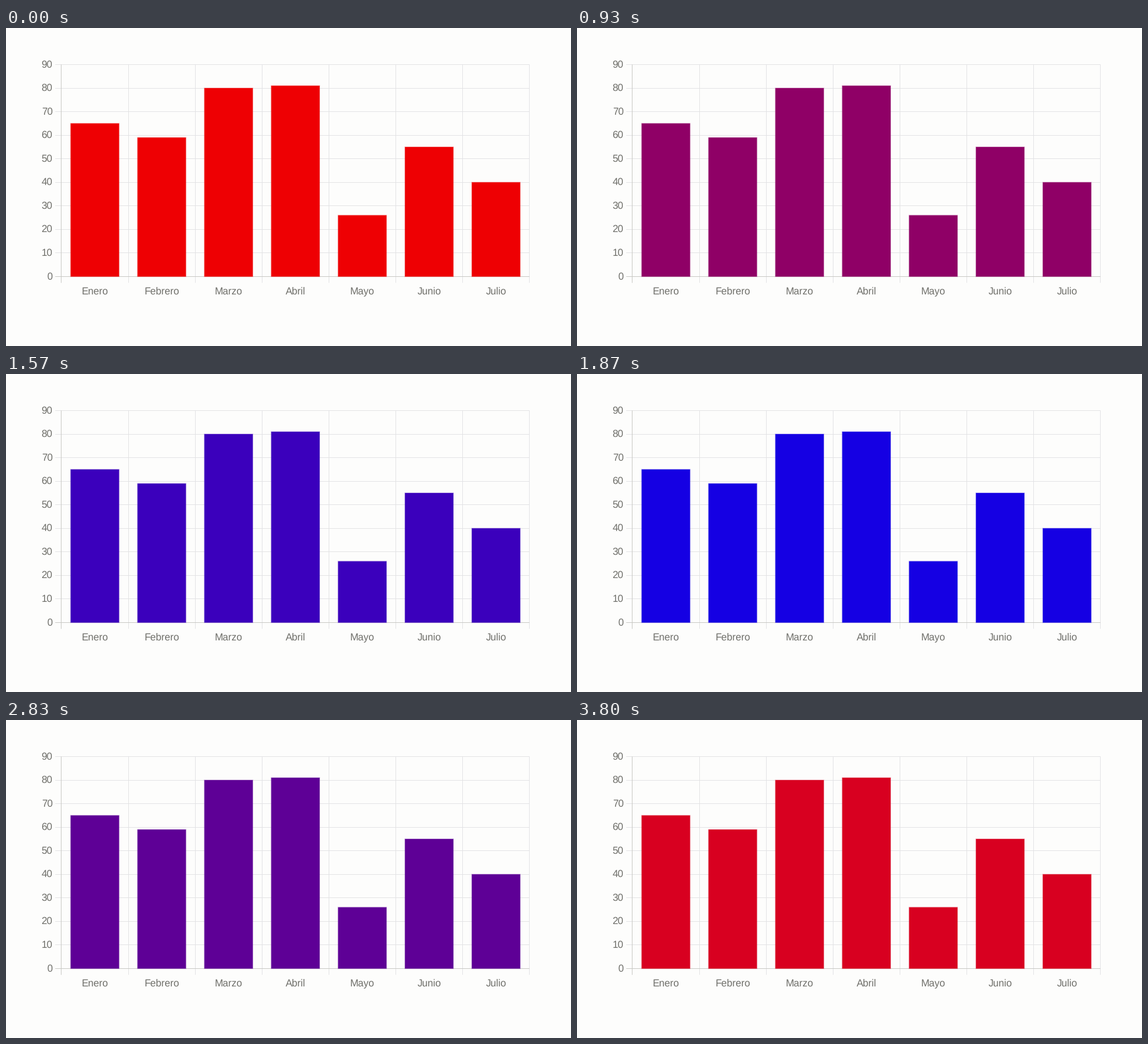
Recreate the animation shown at these times as a matplotlib script. Size 998x561 px, loop 3830 ms.

```python
import math
import numpy as np
import matplotlib.pyplot as plt
from matplotlib.animation import FuncAnimation
from matplotlib.colors import to_rgba
from matplotlib.patches import Rectangle

W, H, DPI = 998, 561, 64
PX = 72 / DPI                     # points per pixel
LOOP, FRAMES = 3830, 115
LEFT, STEP, TOP, BASE = 97.9, 118.1, 64.5, 438.5
TICK = 11

MONTHS = ["Enero", "Febrero", "Marzo", "Abril", "Mayo", "Junio", "Julio"]
VALUES = [65, 59, 80, 81, 26, 55, 40]
RIGHT = LEFT + STEP * len(MONTHS)

# Red fades to blue and back at a nearly constant rate
KEY_MS = [0, 50, 630, 1270, 1870, 2050, 2110, 2830, 3330, 3800]
RED = [236, 243, 177, 100, 22, 3, 3, 92, 160, 216]
BLUE = [4, 2, 67, 146, 226, 243, 243, 152, 88, 32]

GRID, AXIS, TEXT, PAPER = "#e2e2e4", "#c6c6c2", "#70706b", "#fdfdfc"

plt.rcParams["font.family"] = "Liberation Sans"
plt.rcParams["text.hinting"] = "none"
plt.rcParams["toolbar"] = "None"

fig = plt.figure(figsize=(W / DPI, H / DPI), dpi=DPI, facecolor=PAPER)
ax = fig.add_axes([0, 0, 1, 1])
ax.set_xlim(0, W)
ax.set_ylim(H, 0)
ax.axis("off")


def y_of(value):
    return BASE - value * (BASE - TOP) / 90


def crisp(v):
    """Centre of the pixel that holds v."""
    return math.floor(v) + 0.5


def line(xs, ys, color, z=1):
    ax.plot(xs, ys, color=color, lw=PX, solid_capstyle="butt", snap=False, zorder=z)


def hline(y, color, z=1):
    line([LEFT - TICK, RIGHT], [crisp(y)] * 2, color, z)


def vline(x, color, z=1):
    line([crisp(x)] * 2, [TOP, BASE + TICK], color, z)


def label(x, y, text, align):
    ax.text(x, y, text, ha=align, va="baseline", color=TEXT, fontsize=17.6 * PX)


for value in range(0, 91, 10):
    hline(y_of(value), GRID)
    label(82.2, y_of(value) + 4.9, str(value), "right")

for i in range(len(MONTHS) + 1):
    vline(LEFT + i * STEP, GRID)

vline(LEFT, AXIS, 2)
hline(BASE, AXIS, 2)

bars = []
width = 0.723 * STEP
for i, (month, value) in enumerate(zip(MONTHS, VALUES)):
    mid = LEFT + (i + 0.5) * STEP
    bar = Rectangle((mid - width / 2, y_of(value)), width, BASE - y_of(value),
                    lw=1.6 * PX, zorder=3, snap=False)
    bars.append(ax.add_patch(bar))
    label(mid, 470, month, "center")


def update(n):
    ms = (n + 0.5) * LOOP / FRAMES
    color = (np.interp(ms, KEY_MS, RED) / 255, 0, np.interp(ms, KEY_MS, BLUE) / 255)
    for bar in bars:
        bar.set_facecolor(color)
        bar.set_edgecolor(to_rgba(color, 0.3))   # soft rim
    return bars


anim = FuncAnimation(fig, update, frames=FRAMES, interval=LOOP / FRAMES,
                     init_func=lambda: update(0), repeat=True, repeat_delay=0,
                     blit=False)
plt.show()
```
